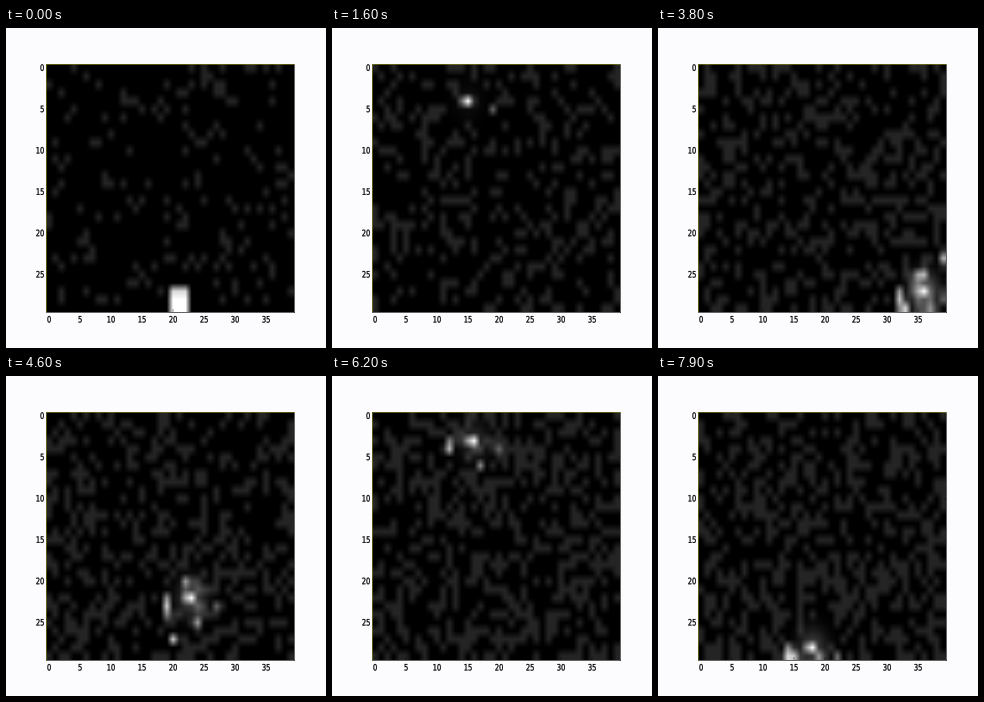
A matplotlib script that plays this animation: 320 by 320 pixels, repeating every 8000 ms.

```python
import numpy as np
import matplotlib.pyplot as plt
from matplotlib.animation import FuncAnimation
from matplotlib.patches import PathPatch
from matplotlib.textpath import TextPath
from matplotlib.transforms import Affine2D

SIZE, DPI = 320, 100
COLS, ROWS = 40, 30
FRAMES, STEP = 80, 100
LEFT, TOP, SIDE = 40, 36, 248
PEAK = 7        # hottest cell, in sensor counts
NOISE = 0.2     # sensor noise, in counts
PT = 72 / DPI   # points per pixel

# Path of the hot spot: step, x, y, number of sparks around it
PATH = np.array([
    (0, 21, 28, 0),
    (16, 15, 4, 2),
    (28, 15, 14, 0),
    (38, 36, 27, 14),
    (46, 23, 22, 10),
    (62, 16, 3, 6),
    (79, 18, 28, 9),
])

yy, xx = np.mgrid[:ROWS, :COLS]
spark_rng = np.random.default_rng(4)
OFFSETS = spark_rng.normal(0, 2.2, (14, 2))
HEATS = spark_rng.uniform(.3, .9, 14)


def path_at(i):
    return [np.interp(i, PATH[:, 0], col) for col in PATH.T[1:]]


def background(i, rng):
    """Counts drift upwards, with one dip where the level settles."""
    level = .29 + .17 * np.sqrt(i / FRAMES)
    level -= .41 * np.exp(-((i - 28) / 1.2) ** 2)
    return np.round(rng.normal(level, NOISE, (ROWS, COLS)))


def put(grid, x, y, heat):
    x, y = np.clip(np.rint([x, y]).astype(int), 0, [COLS - 1, ROWS - 1])
    grid[y, x] = max(grid[y, x], PEAK * heat)


def sensor(i):
    rng = np.random.default_rng(500 + i)
    cx, cy, sparks = path_at(i)
    grid = background(i, rng)
    halo = np.exp(-((xx - cx) ** 2 + (yy - cy) ** 2) / 5)
    grid += PEAK * .4 * sparks / len(HEATS) * halo

    for (dx, dy), heat in list(zip(OFFSETS, HEATS))[:round(sparks)]:
        put(grid, cx + dx, cy + dy, heat * rng.uniform(.8, 1))

    # The core starts as a block and shrinks to a single cell
    core = round(max(0, 1 - i / 16))
    for dx in range(-core, core + 1):
        for dy in range(-core, core + 1):
            put(grid, cx + dx, cy + dy, min(1, 1 + .15 * dy))
    return grid


fig = plt.figure(figsize=(SIZE / DPI, SIZE / DPI), dpi=DPI, facecolor="#fcfcff")
page = fig.add_axes([0, 0, 1, 1])
page.set(xlim=(0, SIZE), ylim=(SIZE, 0))
page.axis("off")

ax = fig.add_axes([LEFT / SIZE, 1 - (TOP + SIDE) / SIZE, SIDE / SIZE, SIDE / SIZE])
image = ax.imshow(sensor(0), cmap="gray", interpolation="bilinear", aspect="auto")
ax.set(xticks=range(0, COLS, 5), yticks=range(0, ROWS, 5))
ax.tick_params(direction="in", top=True, right=True, width=.4 * PT,
               labelbottom=False, labelleft=False)
ax.tick_params(axis="x", length=3 * PT)
ax.tick_params(axis="y", length=2.2 * PT)
ax.spines[:].set_linewidth(.6 * PT)
ax.spines[["top", "left"]].set_color("#8c8c20")


def label(text, x, y, ha):
    """Draw a tick label; the 4:3 plot is shown on a square page."""
    path = TextPath((0, 0), text, size=13.3, prop={"family": "DejaVu Sans"})
    box = path.get_extents()
    anchor = box.x1 if ha == "right" else (box.x0 + box.x1) / 2
    fit = (Affine2D().translate(-anchor, -(box.y0 + box.y1) / 2)
           .scale(1 / 2, -2 / 3).translate(x, y))
    page.add_patch(PathPatch(fit.transform_path(path), fc="black", ec="black",
                             lw=.25 * PT))


for n in range(0, COLS, 5):
    label(str(n), LEFT + (n + .5) * SIDE / COLS, TOP + SIDE + 7.3, "center")
for n in range(0, ROWS, 5):
    label(str(n), LEFT - 2.2, TOP - .5 + (n + .5) * SIDE / ROWS, "right")


def update(i):
    grid = sensor(i)
    image.set_data(grid)
    image.set_clim(grid.min(), grid.max())
    return [image]


anim = FuncAnimation(fig, update, frames=FRAMES, interval=STEP,
                     repeat=True, repeat_delay=0, blit=False)
plt.show()
```
